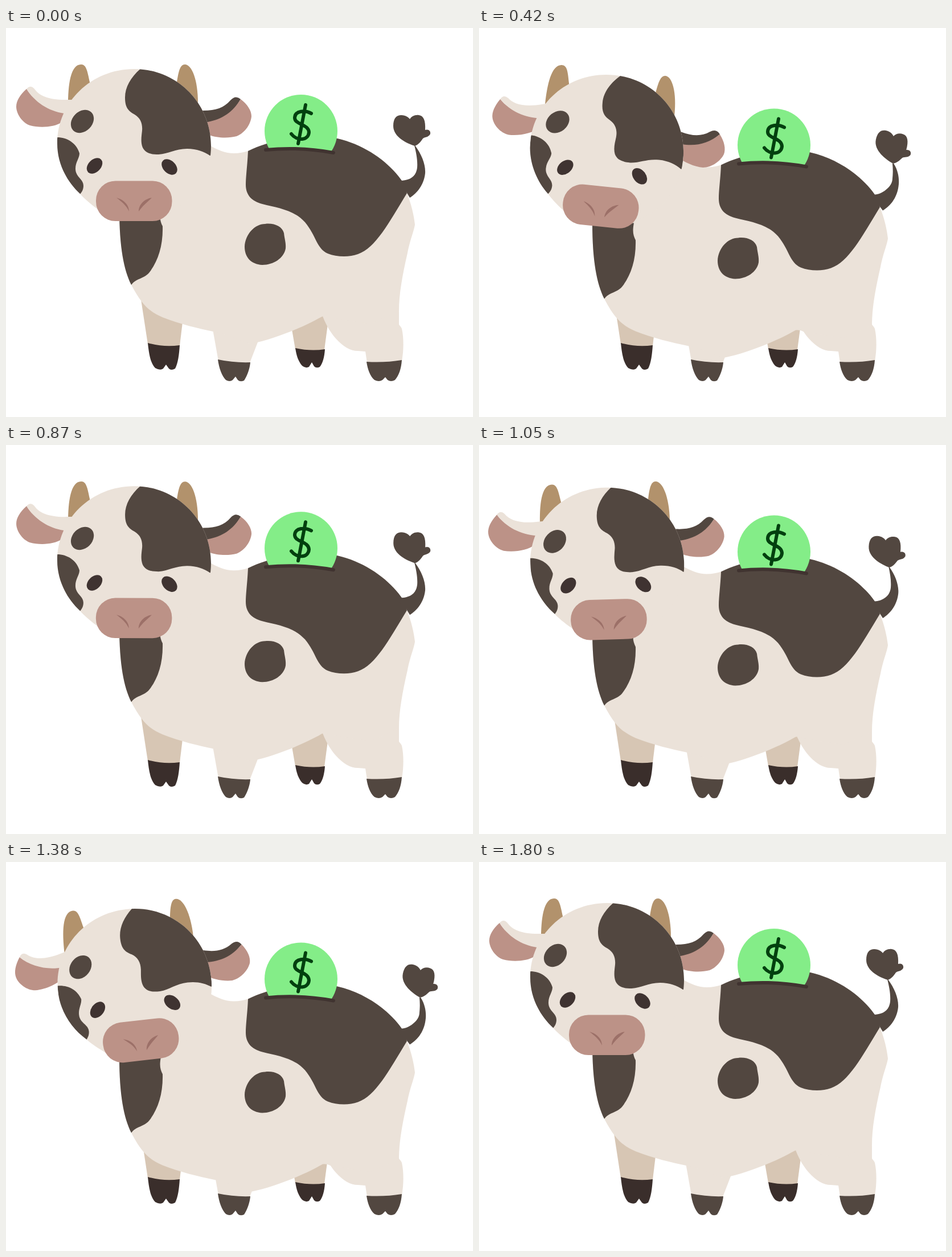
An HTML page that plays this animation: 820x683 px, repeating every 1860 ms.

```html
<!DOCTYPE html>
<html lang="en">
<head>
<meta charset="utf-8">
<title>Cow bank</title>
<style>
  html, body { margin: 0; width: 100%; height: 100%; overflow: hidden; background: #fff; }
  svg { display: block; width: 100vw; height: 100vh; }
  .cream { fill: #ebe2d9; }
  .dark { fill: #524740; }
  .ink { fill: #3f3331; }
  .pink { fill: #bc9287; }
  .horn { fill: #b2926c; }
  .shade { fill: #d7c6b4; }
  .hoof { fill: #3a2e2b; }
  .nostril { fill: #9c7068; }
  .line { fill: none; stroke-linecap: round; stroke-linejoin: round; stroke-width: 6; }
</style>
</head>
<body>
<svg viewBox="0 0 820 683">
  <defs>
    <path id="skull" d="M225 72C300 72 360 132 360 207C360 285 300 336 225 336C200 336 175 328 158 316C145 306 137 299 130 291C107 270 90 238 90 203C90 130 150 72 225 72Z"/>
    <clipPath id="inHead"><use href="#skull"/></clipPath>
    <clipPath id="aboveSlot"><path d="M440 100H600V224L575 219Q516 208 456 214H440Z"/></clipPath>
  </defs>

  <!-- legs stay planted -->
  <path class="shade" d="M236 470L249 555Q277 562 305 558L312 500Z"/>
  <path class="hoof" d="M249 553Q277 561 305 557C304 573 302 589 297 598Q290 602 286 598L281 591L276 598Q271 602 262 597C254 589 251 573 249 553Z"/>
  <path class="shade" d="M499 512L508 564Q535 569 559 565L567 505Z"/>
  <path class="hoof" d="M508 562Q535 568 560 564C559 578 556 589 551 595Q545 598 541 594L537 587L532 595Q526 598 520 593C513 585 510 575 508 562Z"/>
  <path class="cream" d="M360 512L373 585Q400 590 428 588L450 531Z"/>
  <path class="dark" d="M372 582Q400 588 429 587C428 598 424 610 418 619Q411 622 407 618L403 612L398 618Q393 622 386 618C379 611 374 597 372 582Z"/>
  <path class="cream" d="M556 506C563 524 570 534 578 544C592 560 605 567 618 567L631 568L634 588L695 585C698 570 699 545 695 528C693 523 690 522 690 520V480L640 470L560 490Z"/>
  <path class="dark" d="M633 586Q665 588 695 583C694 598 690 610 683 618Q676 622 670 618L666 613L661 618Q655 622 647 618C639 611 635 599 633 586Z"/>

  <g id="body">
    <path class="cream" d="M199 318C199 385 207 425 220 451C238 485 250 497 275 508C305 520 340 528 364 533C395 539 415 553 432 554C470 547 525 524 556 506Q563 505 571 509L640 520L690 497C690 467 696 434 705 395C710 370 716 358 718 345C716 328 712 310 704 290L695 268C672 235 630 205 582 194C566 190 550 190 530 190C500 190 475 197 455 204C445 207 435 211 425 216C418 218 410 220 400 220C385 220 372 214 355 205L230 250Z"/>
    <path class="dark" d="M199 318C199 385 207 425 220 451C229 439 241 441 251 430C267 410 276 382 275 348C271 340 269 333 272 318Z"/>
    <path class="dark" d="M425 216C424 240 421 260 421 275C421 293 431 304 450 309C477 316 505 319 525 341C545 365 545 387 565 396C580 402 602 403 618 397C649 386 671 344 704 290L695 268C672 235 630 205 582 194C566 190 550 190 530 190C500 190 475 197 455 204C445 207 435 211 425 216Z"/>
    <path id="stem" class="dark"/>
    <path id="tuft" class="dark" d="M718 207C705 203 680 192 680 172C680 158 686 153 694 153C702 153 707 157 709 160C712 155 718 152 725 153C733 154 737 162 736 179C742 177 746 181 745 186C742 192 736 191 732 194C728 200 724 205 718 207Z"/>
    <path class="dark" d="M455 344C470 342 485 348 488 360C489 370 492 378 491 387C488 404 470 416 450 416C430 415 419 402 419 384C420 362 437 344 455 344Z"/>
    <circle cx="518" cy="181" r="64" fill="#84ed88" clip-path="url(#aboveSlot)"/>
    <path class="line" stroke="#02400f" d="M526 135L513 203M536 150C525 144 508 145 507 157C506 170 531 168 532 183C531 198 511 199 501 186"/>
    <path class="line" stroke="#403330" d="M456 214Q516 208 575 219"/>
  </g>

  <g id="head">
    <path class="horn" d="M109 136C109 100 113 64 132 64C141 64 143 76 147 95L150 130Z"/>
    <path class="horn" d="M300 95C303 75 306 64 314 64C326 64 337 90 337 132L300 130Z"/>
    <!-- each ear: whole outline in the rim colour, inner ear on top -->
    <g id="earL">
      <path class="cream" d="M36 107Q43 99 50 107C58 119 76 127 109 126H140V156L97 160L60 140Z"/>
      <path class="pink" d="M36 107C24 118 18 128 18 138C18 150 28 166 42 171C60 176 85 174 97 166L135 152L102 150C75 146 50 130 36 107Z"/>
    </g>
    <g id="earR">
      <path class="dark" d="M412 125Q403 117 394 127C383 140 368 145 347 145L310 150V172L354 172L390 160Z"/>
      <path class="pink" d="M412 125C424 134 431 145 431 155C430 168 420 184 405 190C390 194 370 193 357 188L310 172L354 165C380 160 398 148 412 125Z"/>
    </g>
    <use href="#skull" class="cream"/>
    <g class="dark" clip-path="url(#inHead)">
      <path d="M238 70C220 85 209 103 209 122C209 140 215 146 226 152C236 158 240 168 239 180C238 190 236 200 240 210C245 220 255 222 268 222C285 221 297 212 318 212C335 212 348 217 358 224L380 220V60Z"/>
      <path d="M80 192H90C107 192 124 202 129 220C129 229 122 235 122 247C122 262 136 265 136 277C136 285 132 289 130 292L80 300Z"/>
    </g>
    <ellipse class="dark" cx="134" cy="164" rx="22.500" ry="17.500" transform="rotate(-45 134 164)"/>
    <ellipse class="ink" cx="155.5" cy="242" rx="16" ry="11" transform="rotate(-45 155.5 242)"/>
    <ellipse class="ink" cx="287" cy="244" rx="16" ry="11" transform="rotate(45 287 244)"/>
    <rect class="pink" x="158" y="268.5" width="133.5" height="70.5" rx="34"/>
    <path class="nostril" d="M194 298C206 301 216 310 216 322C211 311 203 305 194 298Z"/>
    <path class="nostril" d="M256 298C243 300 233 310 233 322C240 312 248 306 256 298Z"/>
  </g>
</svg>
<script>
  const LOOP = 1860, STEP = 30, HALF = 900;
  const [body, stem, tuft, head, earL, earR] =
    ["body", "stem", "tuft", "head", "earL", "earR"].map(id => document.getElementById(id));
  const smooth = x => x * x * (3 - 2 * x);
  const set = (el, value) => el.setAttribute("transform", value);

  // k: 0 = upright tail, 1 = swung right
  const stemPath = k => `M${718 + 10 * k} ${206 + 7 * k}
    C${730 + 6 * k} ${222 + 3 * k} ${737 + k} 240 ${736 + k} ${255 - 5 * k}
    C${734 + k} ${275 - 3 * k} ${722 + 2 * k} ${290 - 3 * k} 709 ${298 - 2 * k}
    L703 288L690 276L695 268
    C${708 - 2 * k} ${267 + k} ${720 + 6 * k} ${262 - 7 * k} ${722 + 4 * k} ${245 - 5 * k}
    C${723 + 4 * k} ${232 - 2 * k} ${720 + 7 * k} ${218 + 4 * k} ${717 + 9 * k} ${206 + 7 * k}Z`;

  function draw(t) {
    const phase = (t % HALF) / HALF;
    const k = smooth(1 - Math.abs(2 * phase - 1));
    const tilt = t < HALF ? 6 : -6.6;
    set(body, `translate(0 ${24.8 * k})`);
    stem.setAttribute("d", stemPath(k));
    set(tuft, `rotate(${12 * k} 692 253)`);
    set(head, `translate(0 ${10.2 * k}) rotate(${tilt * k} 225 198)`);
    set(earL, `rotate(${-14 * k} 147 147)`);
    set(earR, `rotate(${15 * k} 295 170)`);
  }

  const start = performance.now();
  function frame() {
    const t = (performance.now() - start) % LOOP;
    draw(Math.min(Math.floor(t / STEP) * STEP, 2 * HALF));
    requestAnimationFrame(frame);
  }
  draw(0);
  requestAnimationFrame(frame);
</script>
</body>
</html>
```
